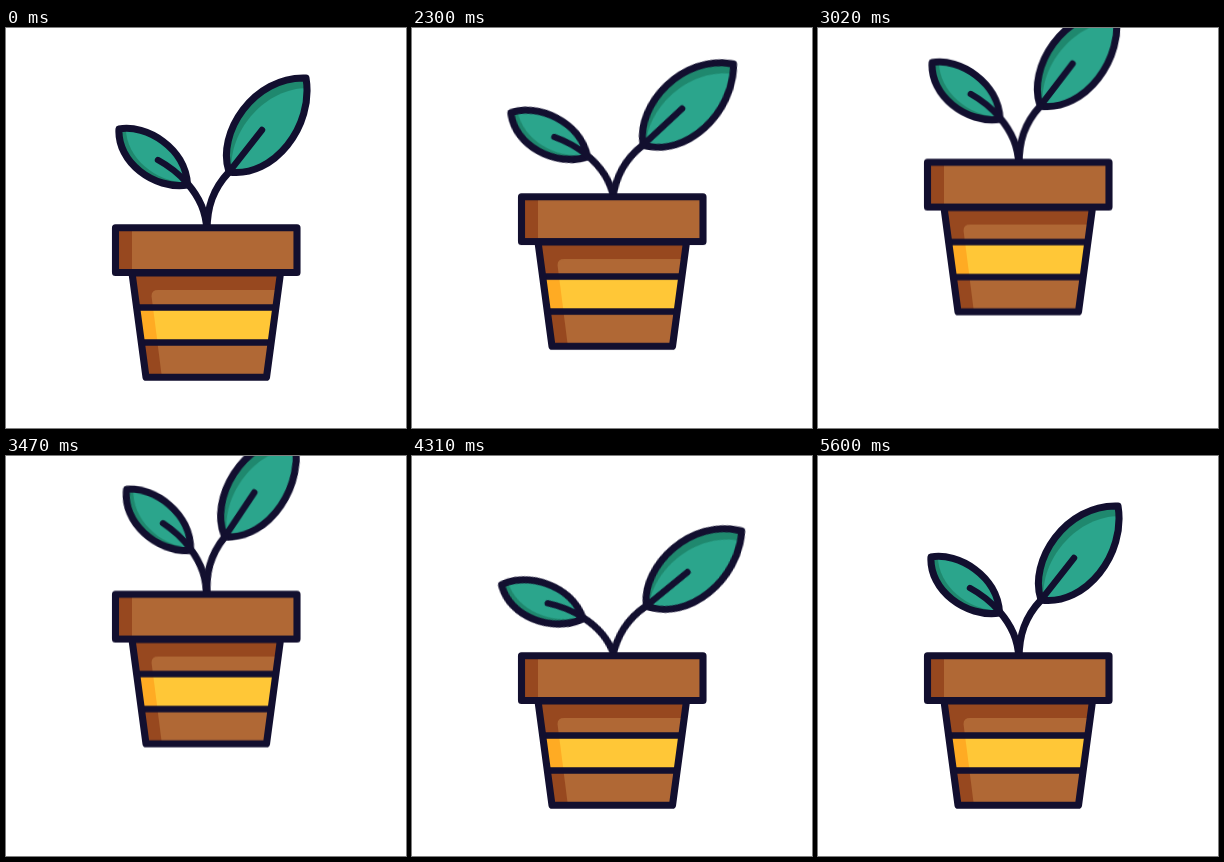
Write an HTML page that moves like this. It is 400 px wide and 400 px high and loops after 5630 ms.

```html
<!DOCTYPE html>
<html lang="en">
<head>
<meta charset="utf-8">
<title>Hopping plant</title>
<style>
  html, body { margin: 0; width: 100%; height: 100%; overflow: hidden; background: #fff; }
  svg { display: block; width: 100vw; height: 100vh; }

  .line { fill: none; stroke: #120f2f; stroke-width: 7.1; stroke-linecap: round; stroke-linejoin: round; }
  .thin { stroke-width: 6.4; }
  .clay { fill: #b06835; }
  .clay-dark { fill: #97481f; }
  .band { fill: #ffc737; }
  .band-dark { fill: #ffab23; }
  .leaf { fill: #2ba58c; }
  .leaf-dark { fill: #1f886e; }

  .plant { animation: hop 5630ms infinite; }
  .sprout { animation: sway 5630ms infinite cubic-bezier(.333, 0, .667, 1); }
  .left { --dir: -1deg; --first: 15.8; --second: 16.8; transform-origin: 196px 195px; }
  .right { --dir: 1deg; --first: 15; --second: 12.6; transform-origin: 201px 198px; }

  @keyframes hop {
    0% { transform: translateY(0); }
    35.7% { transform: translateY(0); animation-timing-function: ease; }
    54.17% { transform: translateY(-65.5px); }
    58.97% { transform: translateY(-65.5px); animation-timing-function: cubic-bezier(.333, 0, .667, 1); }
    76.73%, 100% { transform: translateY(0); }
  }

  /* Positive angles spread the leaves, negative ones lift them. */
  @keyframes sway {
    0%, 35.7% { transform: rotate(0deg); }
    44.94% { transform: rotate(calc(var(--first) * var(--dir))); animation-timing-function: ease; }
    61.99%, 65.36% { transform: rotate(calc(-4.5 * var(--dir))); }
    77.09% { transform: rotate(calc(var(--second) * var(--dir))); }
    89.88% { transform: rotate(calc(-5 * var(--dir))); }
    99.47%, 100% { transform: rotate(0deg); }
  }
</style>
</head>
<body>
<svg viewBox="0 0 400 400">
  <defs>
    <path id="leafL" d="M113 101C140 96 180 120 181.500 157C148 162 111 134 113 101Z"/>
    <path id="leafR" d="M223 144C210 105 248 48 300 50C308 98 268 150 223 144Z"/>
    <path id="body" d="M126 245L140 349.300H260.500L274.500 245Z"/>
    <clipPath id="clipL"><use href="#leafL"/></clipPath>
    <clipPath id="clipR"><use href="#leafR"/></clipPath>
    <clipPath id="clipBody"><use href="#body"/></clipPath>
  </defs>

  <g class="plant">
    <g class="sprout left">
      <use href="#leafL" class="leaf-dark"/>
      <g clip-path="url(#clipL)"><use href="#leafL" class="leaf" x="7" y="-3"/></g>
      <use href="#leafL" class="line"/>
      <path class="line thin" d="M152 132C163 138 173 146 181 155"/>
      <path class="line" d="M181 155C194 170 200 184 201 203"/>
    </g>
    <g class="sprout right">
      <use href="#leafR" class="leaf-dark"/>
      <g clip-path="url(#clipR)"><use href="#leafR" class="leaf" x="5" y="10"/></g>
      <use href="#leafR" class="line"/>
      <path class="line thin" d="M256 102L223 144"/>
      <path class="line" d="M223 144C207 161 201 179 201 203"/>
    </g>

    <g clip-path="url(#clipBody)">
      <path class="clay-dark" d="M120 245H280V350H120Z"/>
      <path class="clay" d="M280 262H152Q145 262 145.600 269L156 350H280Z"/>
      <path class="band-dark" d="M120 279.500H280V314.500H120Z"/>
      <path class="band" d="M147 279.500H280V314.500H151.500Z"/>
    </g>
    <path class="line thin" d="M131 279.500H269M136 314.500H264"/>
    <use href="#body" class="line"/>

    <path class="clay" d="M109.500 199.800H291V244.500H109.500Z"/>
    <path class="clay-dark" d="M109.500 199.800H126V244.500H109.500Z"/>
    <path class="line" d="M109.500 199.800H291V244.500H109.500Z"/>
  </g>
</svg>
</body>
</html>
```
